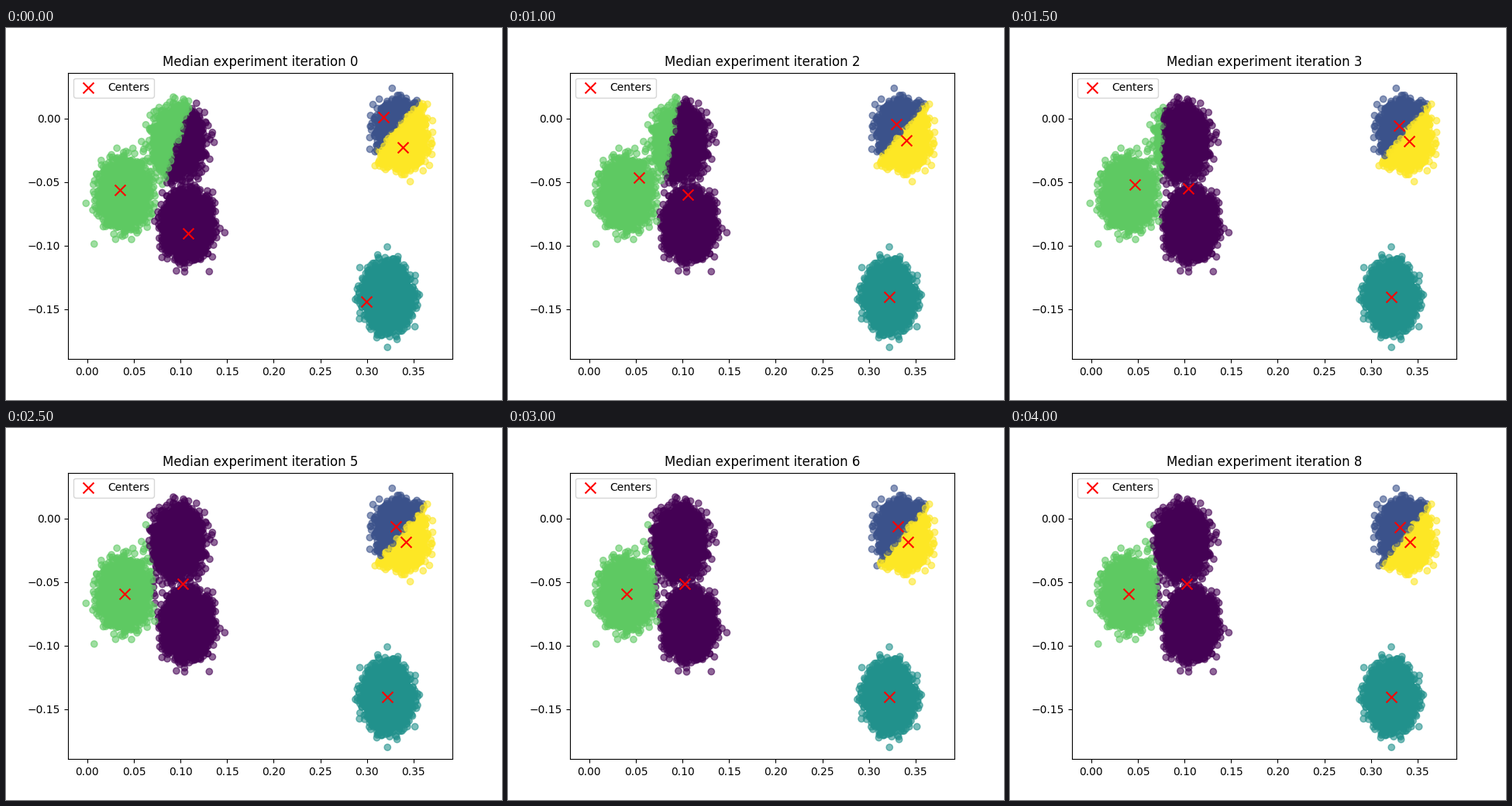
Write a matplotlib script that moves like this. It is 640 px wide and 480 px high and loops after 4500 ms.

```python
import numpy as np
import matplotlib.pyplot as plt
from matplotlib.animation import FuncAnimation

STEPS = 9
STEP_MS = 500
SIGMA = 0.0101
PER_BLOB = 6000

# Middles of the five round blobs
BLOBS = np.array([(0.0397, -0.0593), (0.0972, -0.0185), (0.1074, -0.0837),
                  (0.3368, -0.0130), (0.3220, -0.1406)])

# Where the centers begin, in colour order
STARTS = np.array([(0.1085, -0.0904), (0.3180, 0.0013), (0.2998, -0.1443),
                   (0.0353, -0.0565), (0.3387, -0.0229)])


def make_points():
    """Draw mirrored pairs, so that each blob's mean is exactly its middle."""
    rng = np.random.default_rng(4)
    half = rng.normal(scale=SIGMA, size=(len(BLOBS), PER_BLOB // 2, 2))
    spread = np.concatenate([half, -half], axis=1)
    return (BLOBS[:, None] + spread).reshape(-1, 2)


def nearest(points, centers):
    gaps = points[:, None] - centers
    return (gaps ** 2).sum(axis=2).argmin(axis=1)


def cluster(points, centers):
    """Move each center to the mean of its points, once per step."""
    history = []
    for _ in range(STEPS):
        labels = nearest(points, centers)
        history.append((centers, labels))
        centers = np.array([points[labels == k].mean(axis=0)
                            for k in range(len(centers))])
    return history


points = make_points()
history = cluster(points, STARTS)

fig, ax = plt.subplots(figsize=(6.4, 4.8), dpi=100)
cloud = ax.scatter(*points.T, c=history[0][1], cmap="viridis", alpha=0.6)
marks = ax.scatter(*STARTS.T, c="red", marker="x", s=100, label="Centers")
ax.legend(loc="upper left")
ax.set_xlim(-0.02062, 0.39169)
ax.set_ylim(-0.18933, 0.03604)
title = ax.set_title("")


def update(step):
    centers, labels = history[step]
    cloud.set_array(labels)
    marks.set_offsets(centers)
    title.set_text(f"Median experiment iteration {step}")
    return cloud, marks, title


anim = FuncAnimation(fig, update, frames=STEPS, interval=STEP_MS,
                     init_func=lambda: update(0), repeat=True, repeat_delay=0)
plt.show()
```
